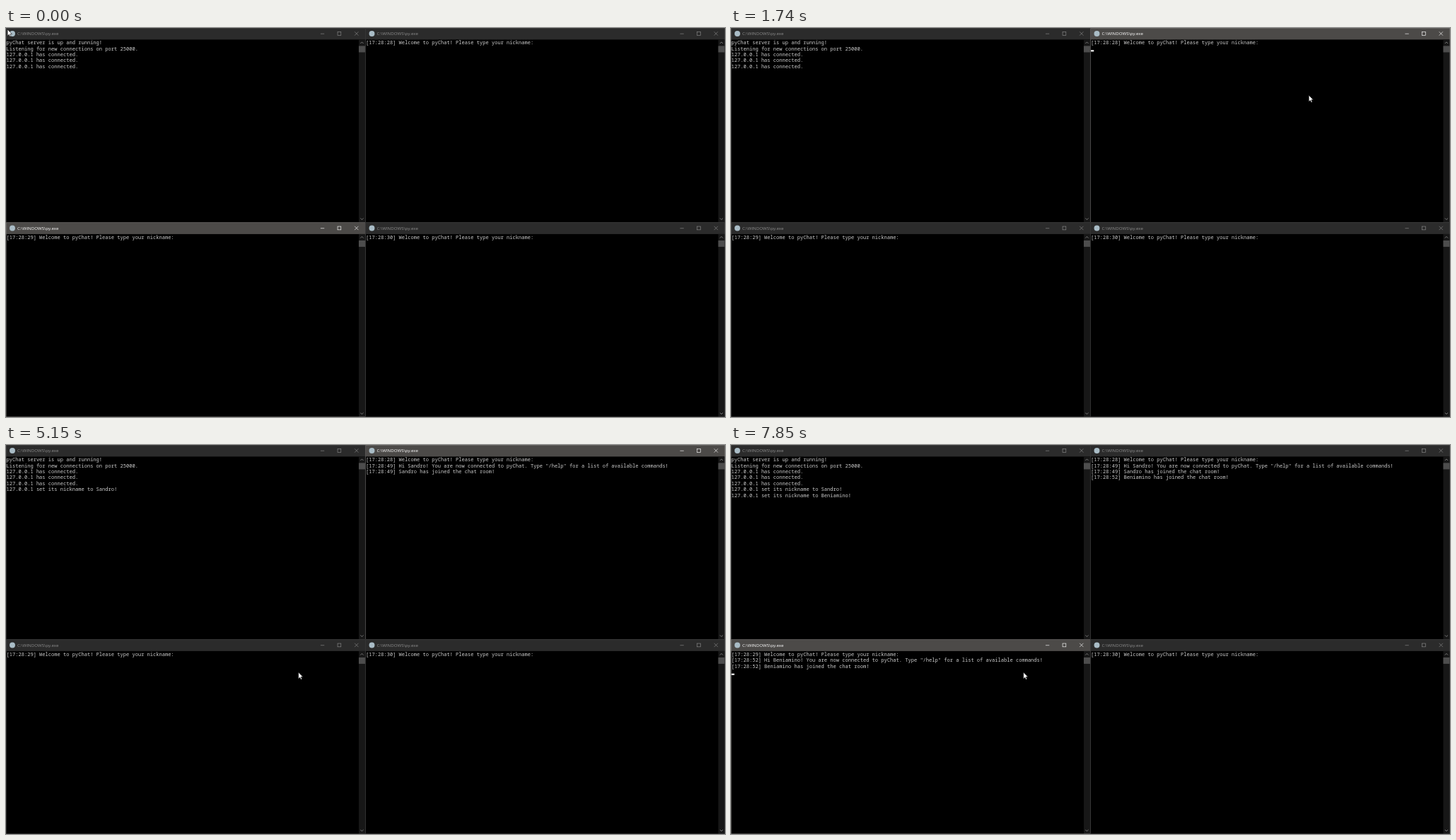
An HTML page with a canvas that plays this animation: 1017x551 px, repeating every 8000 ms.

```html
<!DOCTYPE html>
<html lang="en">
<head>
<meta charset="utf-8">
<title>pyChat</title>
<style>
  html, body { margin: 0; height: 100%; overflow: hidden; background: #000; }
  canvas { display: block; }
</style>
</head>
<body>
<canvas id="stage" width="1017" height="551"></canvas>
<script>
const LOOP = 8000;
const STEP = 80;
// The scene is a 1920 x 1040 desktop with four 960 x 520 consoles.
const W = 960, H = 520, TITLE = 31, CELL_W = 8, CELL_H = 16;
const ctx = document.getElementById('stage').getContext('2d');
const FIRST = 'Sandro', SECOND = 'Beniamino';
const FIRST_JOIN = 4110, SECOND_JOIN = 7450;

// Times at which each letter of the nickname appears
const firstKeys = [2940, 3010, 3250, 3330, 3410, 3560];
const secondKeys = [5710, 5790, 5950, 6510, 6590, 6670, 6830, 6830, 6990];

// Intervals in which the text caret is lit
const firstCaret = [[1340, 1900], [2460, 3090], [3720, 4030]];
const secondCaret = [[540, 780], [5230, 5790], [6350, 7380], [7530, LOOP]];

// Pointer moves: start time, number of steps, target on the desktop
const pointerMoves = [
  [460, 3, 1409, 205],
  [1100, 5, 1543, 180],
  [4670, 4, 781, 608]
];

const typed = (name, keys, t) => name.slice(0, keys.filter(k => t >= k).length);
const lit = (spans, t) => spans.some(([a, b]) => t >= a && t < b);
const welcome = s => `[17:28:${s}] Welcome to pyChat! Please type your nickname:`;
const hello = (s, name) =>
  `[17:28:${s}] Hi ${name}! You are now connected to pyChat. Type "/help" for a list of available commands!`;
const joined = (s, name) => `[17:28:${s}] ${name} has joined the chat room!`;
const renamed = name => `127.0.0.1 set its nickname to ${name}!`;

function rect(color, x, y, w, h) {
  ctx.fillStyle = color;
  ctx.fillRect(x, y, w, h);
}

function line(color, ...points) {
  ctx.strokeStyle = color;
  ctx.beginPath();
  points.forEach(([x, y]) => ctx.lineTo(x, y));
  ctx.stroke();
}

function drawConsole(x, y, active, lines, caretOn) {
  ctx.save();
  ctx.translate(x, y);
  rect('#000', 0, 0, W, H);
  rect(active ? '#4c4a48' : '#2b2b2b', 0, 0, W, TITLE);

  ctx.fillStyle = '#a9bcc6';
  ctx.beginPath();
  ctx.arc(17, 15, 7.5, 0, 2 * Math.PI);
  ctx.fill();

  const ink = active ? '#fff' : '#8c8c8c';
  ctx.fillStyle = ink;
  ctx.font = '11.65px "Open Sans", sans-serif';
  ctx.fillText('C:\\WINDOWS\\py.exe', 30, 19.5);

  ctx.lineWidth = 1.2;
  line(ink, [840, 15.5], [850, 15.5]);
  ctx.strokeRect(885.5, 10.5, 9, 9);
  line(ink, [931, 10], [941, 20]);
  line(ink, [941, 10], [931, 20]);

  rect('#171717', 942, TITLE, 17, H - TITLE);
  rect('#4d4d4d', 942, 48, 17, 17);
  ctx.lineWidth = 1.8;
  line('#7c7c7c', [946.5, 41.5], [950.5, 37.5], [954.5, 41.5]);
  line('#7c7c7c', [946.5, 508.5], [950.5, 512.5], [954.5, 508.5]);

  ctx.fillStyle = '#ccc';
  ctx.font = '13.333px "Noto Sans Mono", monospace';
  lines.forEach((text, i) => ctx.fillText(text, 1, TITLE + i * CELL_H + 12.5));

  if (caretOn) {
    const row = lines.length - 1;
    rect('#fff', 1 + lines[row].length * CELL_W, TITLE + row * CELL_H + 12, CELL_W, 4);
  }

  ctx.lineWidth = 1;
  ctx.strokeStyle = active ? '#777573' : '#484848';
  ctx.strokeRect(0.5, 0.5, W - 1, H - 1);
  ctx.restore();
}

function pointerAt(t) {
  let x = 4, y = 4;
  for (const [start, steps, tx, ty] of pointerMoves) {
    if (t < start) break;
    const p = Math.min(1, (Math.floor((t - start) / STEP) + 1) / steps);
    x += (tx - x) * p;
    y += (ty - y) * p;
  }
  return [x, y];
}

function drawPointer(x, y) {
  ctx.save();
  ctx.translate(x, y);
  ctx.beginPath();
  [[0, 0], [0, 17], [4, 13.3], [6.5, 19], [9.3, 17.8], [6.8, 12], [12, 12]]
    .forEach(([px, py]) => ctx.lineTo(px, py));
  ctx.closePath();
  ctx.lineWidth = 1;
  ctx.strokeStyle = '#000';
  ctx.fillStyle = '#fff';
  ctx.fill();
  ctx.stroke();
  ctx.restore();
}

function draw(t) {
  const server = [
    'pyChat server is up and running!',
    'Listening for new connections on port 25000.',
    ...Array(3).fill('127.0.0.1 has connected.')
  ];
  const first = [welcome(28)], second = [welcome(29)];

  if (t >= FIRST_JOIN) {
    server.push(renamed(FIRST));
    first.push(hello(49, FIRST), joined(49, FIRST));
  }
  if (t >= SECOND_JOIN) {
    server.push(renamed(SECOND));
    first.push(joined(52, SECOND));
    second.push(hello(52, SECOND), joined(52, SECOND));
  }
  first.push(t < FIRST_JOIN ? typed(FIRST, firstKeys, t) : '');
  second.push(t < SECOND_JOIN ? typed(SECOND, secondKeys, t) : '');

  const firstActive = t >= 780 && t < 5230;
  ctx.setTransform(1017 / 1920, 0, 0, 551 / 1040, 0, 0);
  drawConsole(0, 0, false, server, false);
  drawConsole(W, 0, firstActive, first, lit(firstCaret, t));
  drawConsole(0, H, !firstActive, second, lit(secondCaret, t));
  drawConsole(W, H, false, [welcome(30)], false);
  drawPointer(...pointerAt(t));
}

function tick() {
  draw(performance.now() % LOOP);
  requestAnimationFrame(tick);
}
tick();
</script>
</body>
</html>
```
